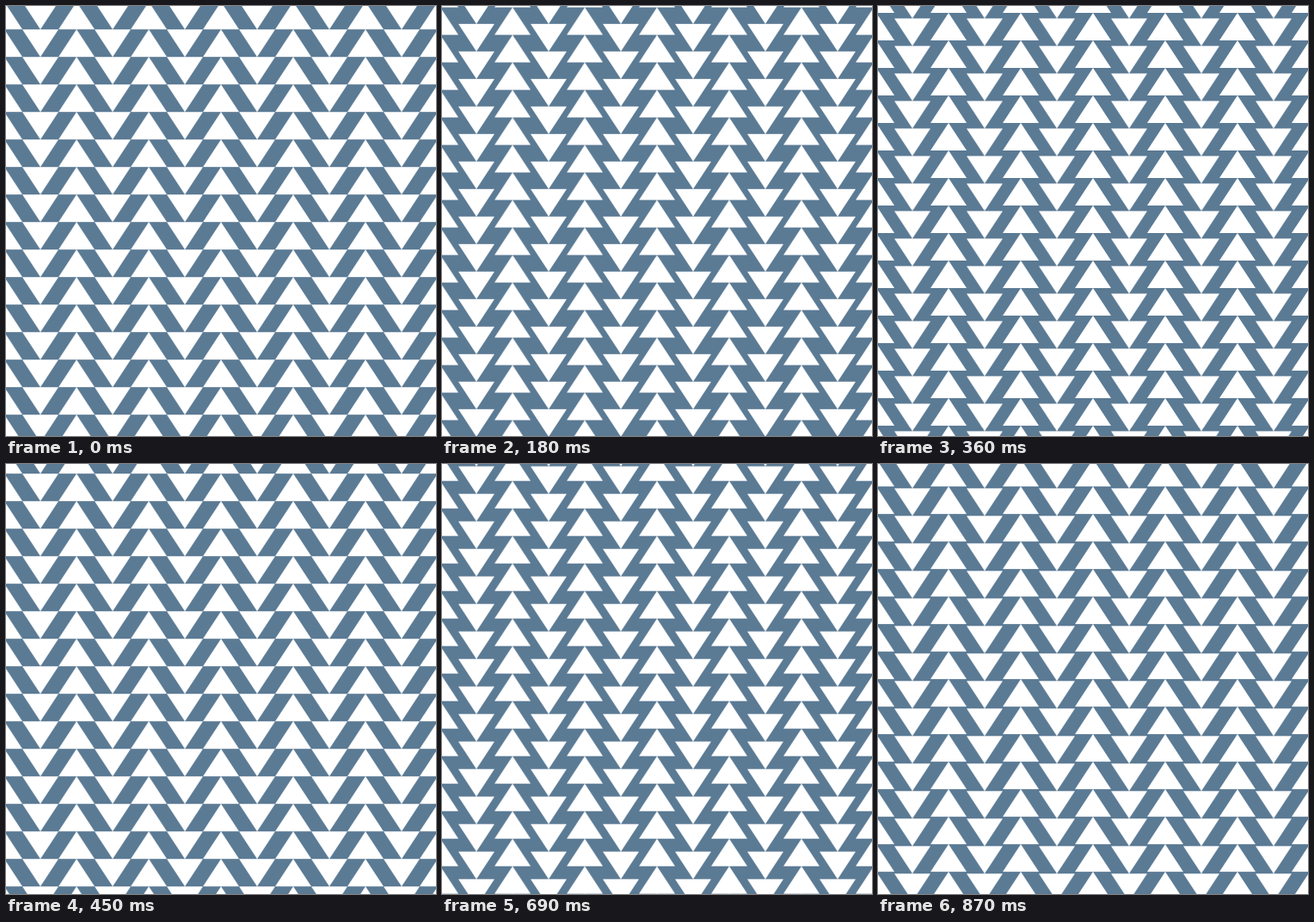
Animation of 500x500 px, one loop 900 ms. Source, as an HTML page without scripts:

```html
<!DOCTYPE html>
<html lang="en">
<head>
<meta charset="utf-8">
<title>Sliding triangles</title>
<style>
  html, body { margin: 0; width: 100%; height: 100%; overflow: hidden; background: #5b7a94; }
  svg { display: block; width: 500px; height: 500px; }
  .slide { fill: #fff; animation: slide 900ms steps(30) infinite; }
  @keyframes slide { to { transform: translateY(-32px); } }
</style>
</head>
<body>
<svg viewBox="0 0 500 500">
  <defs>
    <path id="row" d="M19 0h42l-21 32z m84 0h42l-21 32z m84 0h42l-21 32z m84 0h42l-21 32z m84 0h42l-21 32z m84 0h42l-21 32z m84 0h42l-21 32z"/>
    <!-- each group doubles the number of rows -->
    <g id="rows2"><use href="#row"/><use href="#row" y="32"/></g>
    <g id="rows4"><use href="#rows2"/><use href="#rows2" y="64"/></g>
    <g id="rows8"><use href="#rows4"/><use href="#rows4" y="128"/></g>
    <g id="rows16"><use href="#rows8"/><use href="#rows8" y="256"/></g>
    <g id="rows32"><use href="#rows16"/><use href="#rows16" y="512"/></g>
  </defs>
  <rect width="500" height="500" fill="#5b7a94"/>
  <g transform="translate(0 -4.8)">
    <g class="slide"><use href="#rows32"/></g>
  </g>
  <!-- mirrored copy: points up and slides down -->
  <g transform="translate(-42 539.2) scale(1 -1)">
    <g class="slide"><use href="#rows32"/></g>
  </g>
</svg>
</body>
</html>
```
